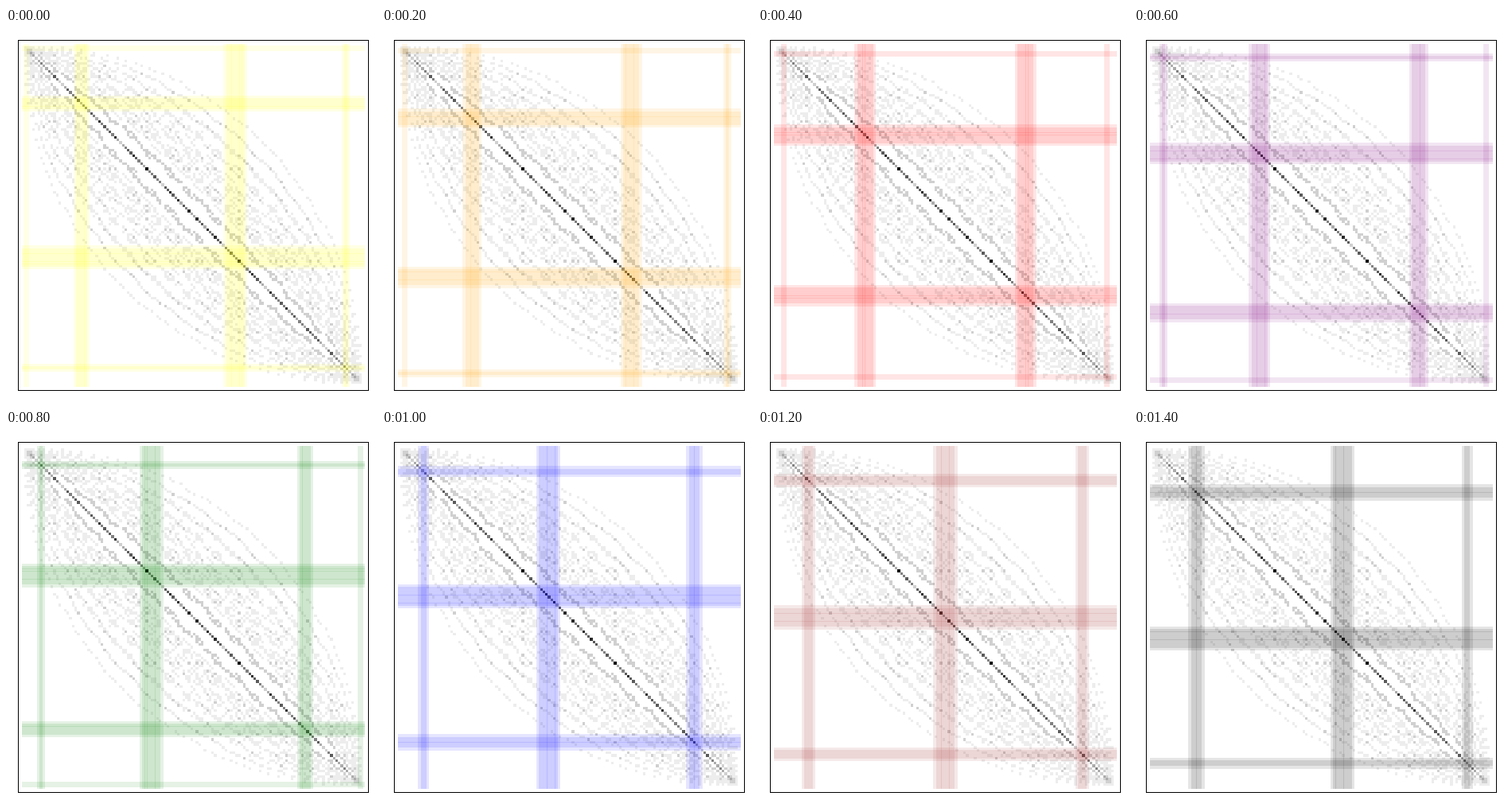
Write a matplotlib script that moves like this. It is 465 px wide and 470 px high and loops after 1600 ms.

```python
from itertools import product

import matplotlib.pyplot as plt
import numpy as np
from matplotlib.animation import ArtistAnimation

WIDTH, HEIGHT, DPI = 465, 470, 100
LEFT, BOTTOM, SIDE = 15, 15, 440    # plot frame in pixels
BITS = 7
COLORS = ["yellow", "orange", "red", "purple",
          "green", "blue", "brown", "black"]


def checksum(word):
    return sum(i * bit for i, bit in enumerate(word, 1))


def deletions(word):
    """All distinct words left after removing one bit."""
    return {word[:i] + word[i + 1:] for i in range(len(word))}


words = sorted(product((0, 1), repeat=BITS), key=lambda w: (checksum(w), w))
balls = [deletions(w) for w in words]
shared = np.array([[len(a & b) for b in balls] for a in balls])

fig = plt.figure(figsize=(WIDTH / DPI, HEIGHT / DPI), dpi=DPI, facecolor="white")
ax = fig.add_axes([LEFT / WIDTH, BOTTOM / HEIGHT, SIDE / WIDTH, SIDE / HEIGHT])
ax.set(xticks=[], yticks=[])
for spine in ax.spines.values():
    spine.set_linewidth(72 / DPI)

ax.imshow(shared, cmap="Greys", vmin=0, vmax=BITS,
          interpolation="nearest", aspect="auto")

ends = np.array([-0.5, len(words) - 0.5])


def highlight(index, color):
    """One translucent column and row through a diagonal cell."""
    style = dict(color=color, alpha=0.1, linewidth=5,
                 solid_capstyle="projecting")
    return (ax.plot([index, index], ends, **style)
            + ax.plot(ends, [index, index], **style))


# Each step shows the words whose checksum has the same residue.
steps = [[] for _ in COLORS]
for index, word in enumerate(words):
    residue = checksum(word) % len(COLORS)
    steps[residue] += highlight(index, COLORS[residue])

margin = 0.02 * len(words)
ax.set_xlim(ends[0] - margin, ends[1] + margin)
ax.set_ylim(ends[1] + margin, ends[0] - margin)

anim = ArtistAnimation(fig, steps, interval=200, repeat=True, repeat_delay=0)
plt.show()
```
